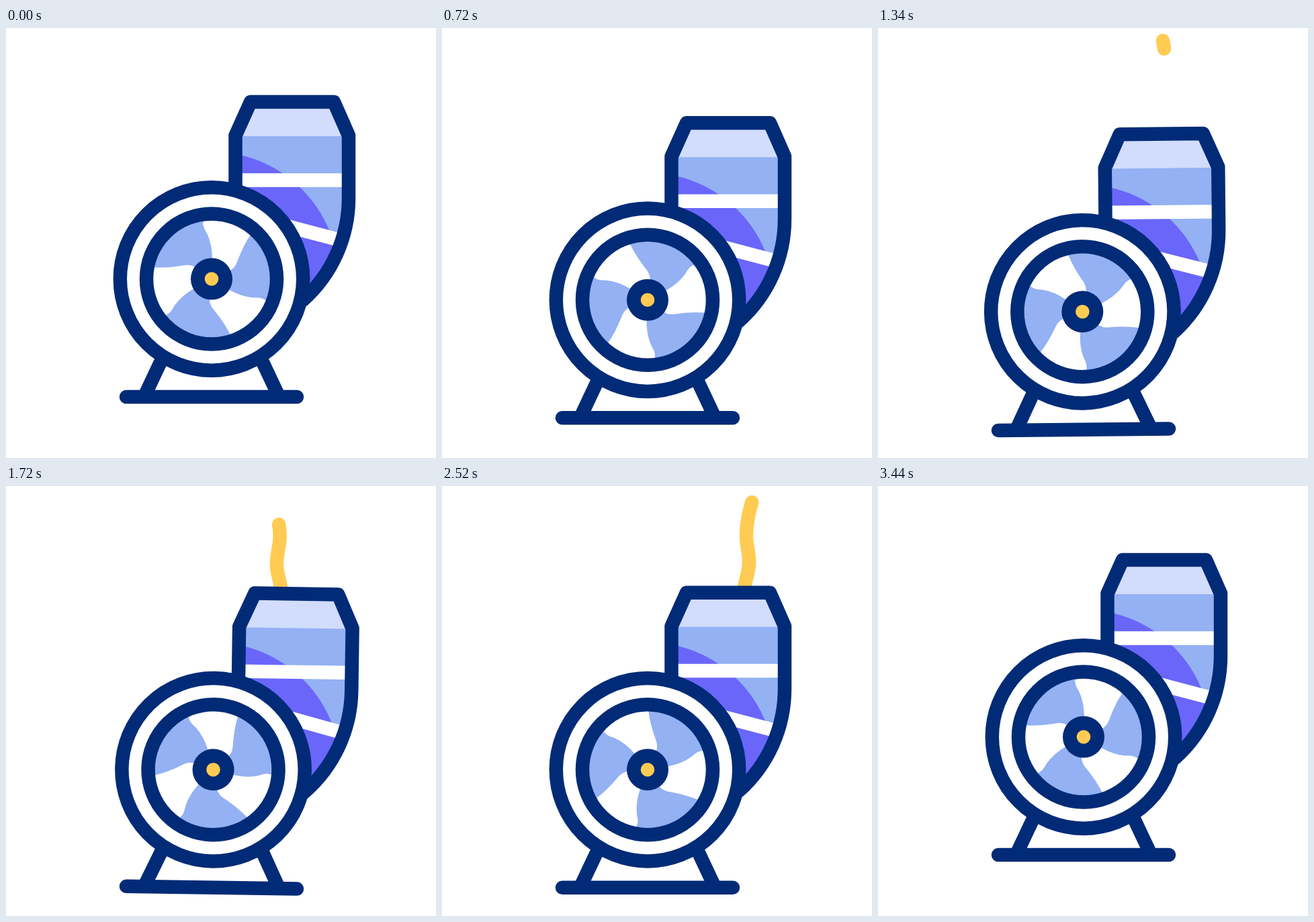
Animation, 640 px wide and 640 px high, one loop 3.54 s. Source, as an HTML page with a canvas:

```html
<!DOCTYPE html>
<html lang="en">
<head>
<meta charset="utf-8">
<title>Confetti cannon</title>
<style>
  html, body { margin: 0; width: 100%; height: 100%; overflow: hidden; background: #fff; }
  canvas { display: block; width: 100vmin; height: 100vmin; }
</style>
</head>
<body>
<canvas id="stage" width="640" height="640"></canvas>
<script>
const ctx = document.getElementById('stage').getContext('2d');

const NAVY = '#022b77', BLUE = '#93b1f3', PALE = '#d2dcfc';
const PURPLE = '#6a66fa', YELLOW = '#ffcb52', WHITE = '#fff';
const LOOP = 3540, STEP = 20, LINE = 20.5;
const HUB = { x: 306, y: 373.5 };
const PIVOT = { x: 306, y: 597.5 };
const DROP = 48.7, LIFT = -14.6;

// Progress from a to b, eased at both ends
function ease(t, a, b) {
  const u = Math.min(1, Math.max(0, (t - a) / (b - a)));
  return u * u * (3 - 2 * u);
}

// Smooth curve through [position, value] pairs, flat at both ends
function spline(keys, p) {
  const last = keys.length - 1;
  if (p <= keys[0][0]) return keys[0][1];
  if (p >= keys[last][0]) return keys[last][1];
  const i = keys.findIndex(k => k[0] > p) - 1;
  const slope = n => n <= 0 || n >= last ? 0
    : (keys[n + 1][1] - keys[n - 1][1]) / (keys[n + 1][0] - keys[n - 1][0]);
  const [p0, v0] = keys[i], [p1, v1] = keys[i + 1];
  const d = p1 - p0, u = (p - p0) / d, w = 1 - u;
  return v0 * w * w * (1 + 2 * u) + v1 * u * u * (3 - 2 * u)
    + d * u * w * (slope(i) * w - slope(i + 1) * u);
}

// Wheel angle in degrees over time
const SPIN = [[120, 0], [500, 80.5], [940, 316], [1340, 665], [2100, 1436.5], [2960, 2031], [3440, 2160]];

// Streamers: delay, top end, and x along y
const STREAMERS = [
  { delay: 0, top: 20, curve: [[5, 424], [20, 429.5], [45, 432], [75, 430], [95, 427], [116, 425.5], [162, 433]] },
  { delay: 788, top: 24, curve: [[5, 384], [24, 390], [49, 397], [75, 400], [116, 396], [162, 404]] },
  { delay: 1540, top: 18.5, curve: [[5, 467], [18, 463], [45, 456], [75, 453], [116, 457], [162, 449]] }
];

function bodyOffset(t) {
  return LIFT * ease(t, 120, 434)
    + (DROP - LIFT) * ease(t, 434, 871)
    - DROP * ease(t, 2886, 3380);
}

function shake(t) {
  if (t < 954 || t > 2280) return 0;
  return 0.92 * Math.sin(2 * Math.PI * (t - 954) / 241) * Math.PI / 180;
}

function fill(color, path) {
  ctx.fillStyle = color;
  ctx.fill(path);
}

function stroke(color, path, width = LINE) {
  ctx.strokeStyle = color;
  ctx.lineWidth = width;
  ctx.stroke(path);
}

function circle(x, y, r) {
  const p = new Path2D();
  p.arc(x, y, r, 0, 2 * Math.PI);
  return p;
}

const tube = new Path2D('M341.5 245V160L364 110H488L510 160V253A204 204 0 0 1 442 405');
const tubeFill = new Path2D(tube);
tubeFill.lineTo(342, 405);
const legs = new Path2D('M232 493L207 546M380 493L405 546');
const base = new Path2D('M179 549H433');
const bands = new Path2D('M340 226.4H512M390 287.5L510 319');
const blade = new Path2D('M0 0L1 -28Q1 -52 -7 -68Q-11.5 -75 -12.5 -80L-13 -92L30 -96L64 -75L57.5 -65Q47 -49 39 -28Q34 -12 20 -10Z');

function drawStreamer(t, { delay, top, curve }) {
  const start = 162, local = t - delay;
  const tip = start + (top - start) * ease(local, 760, 1010);
  const tail = start + (top - start) * ease(local, 1110, 1390);
  if (tail - tip < 0.1) return;
  const p = new Path2D(), count = 40;
  for (let i = 0; i <= count; i++) {
    const y = tail + (tip - tail) * i / count;
    p.lineTo(spline(curve, y), y);
  }
  stroke(YELLOW, p);
}

function drawTube() {
  ctx.save();
  ctx.clip(tubeFill);
  ctx.fillStyle = BLUE;
  ctx.fillRect(320, 90, 220, 340);
  ctx.fillStyle = PALE;
  ctx.fillRect(320, 90, 220, 71);
  fill(PURPLE, circle(HUB.x, HUB.y, 189.5));
  stroke(WHITE, bands);
  ctx.restore();
  stroke(NAVY, tube);
}

function drawWheel(angle) {
  fill(WHITE, circle(HUB.x, HUB.y, 136));
  stroke(NAVY, circle(HUB.x, HUB.y, 136.2));
  fill(BLUE, circle(HUB.x, HUB.y, 90));
  ctx.save();
  ctx.translate(HUB.x, HUB.y);
  ctx.rotate(angle * Math.PI / 180);
  for (let i = 0; i < 3; i++) {
    fill(WHITE, blade);
    ctx.rotate(2 * Math.PI / 3);
  }
  ctx.restore();
  stroke(NAVY, circle(HUB.x, HUB.y, 97));
  fill(NAVY, circle(HUB.x, HUB.y, 31));
  fill(YELLOW, circle(HUB.x, HUB.y, 10.3));
}

function draw(t) {
  ctx.fillStyle = WHITE;
  ctx.fillRect(0, 0, 640, 640);
  ctx.lineCap = ctx.lineJoin = 'round';
  ctx.save();
  ctx.translate(PIVOT.x, PIVOT.y);
  ctx.rotate(shake(t));
  ctx.translate(-PIVOT.x, -PIVOT.y);
  STREAMERS.forEach(s => drawStreamer(t, s));
  ctx.translate(0, bodyOffset(t));
  drawTube();
  stroke(NAVY, legs);
  stroke(NAVY, base);
  drawWheel(spline(SPIN, t));
  ctx.restore();
}

const began = performance.now();
function tick() {
  const t = (performance.now() - began) % LOOP;
  draw(Math.floor(t / STEP) * STEP);
  requestAnimationFrame(tick);
}
tick();
</script>
</body>
</html>
```
